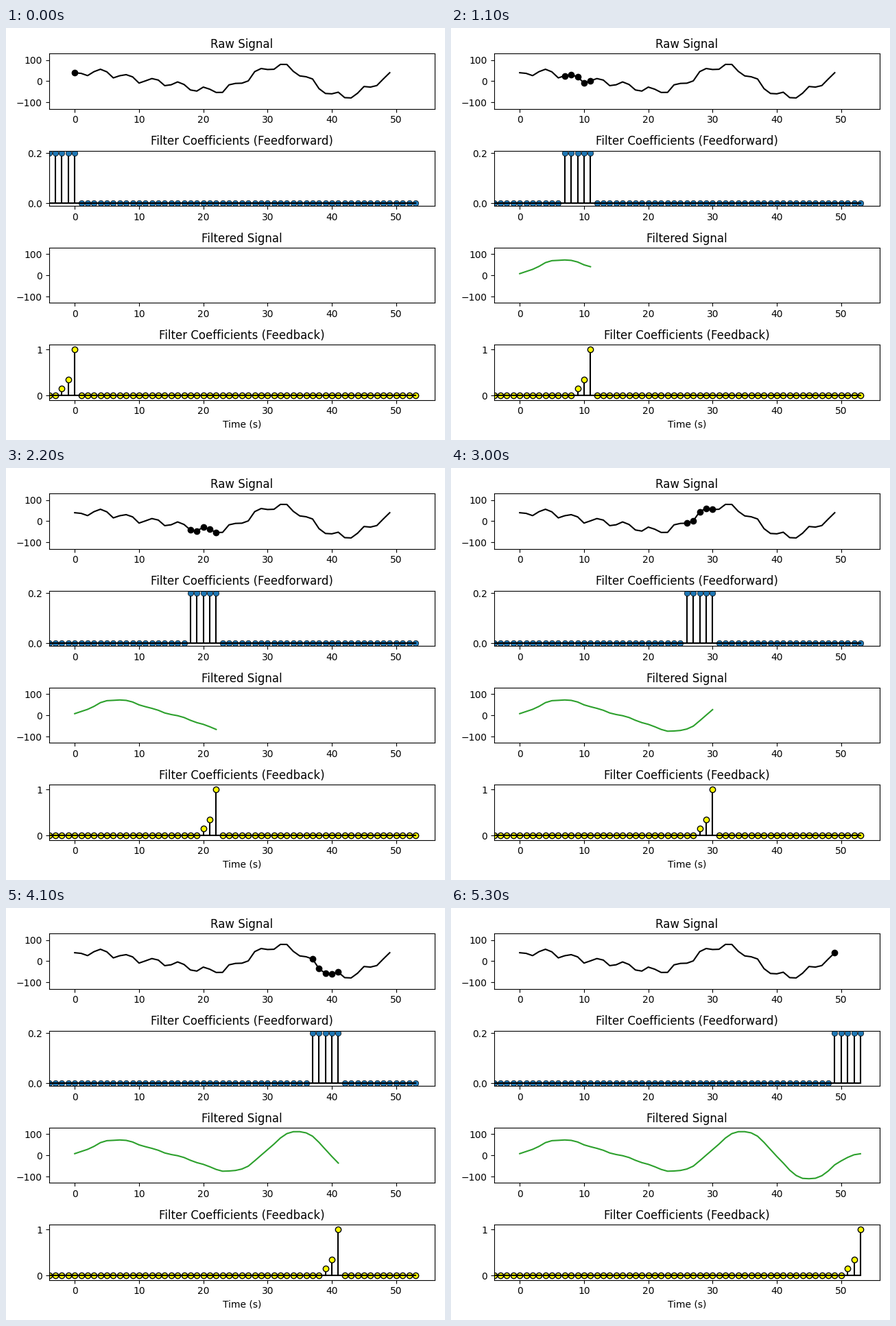
These frames come from a looping animation (640x600 px, 5400 ms). A matplotlib script:

```python
import numpy as np
import matplotlib.pyplot as plt
from matplotlib.animation import FuncAnimation

plt.rcParams["font.family"] = "DejaVu Sans"

SAMPLES = 50
FORWARD = np.full(5, 0.2)
FEEDBACK = np.array([0.15, 0.35, 1.0])  # oldest sample first
STEPS = SAMPLES + len(FORWARD) - 1
TIME = np.arange(1 - len(FORWARD), STEPS)


def raw_signal():
    """Two slow waves with a medium and a fast ripple on top."""
    phase = 2 * np.pi * np.linspace(0, 1, SAMPLES)
    return (50 * np.sin(2 * phase) + 25 * np.cos(3 * phase)
            + 15 * np.cos(12 * phase) + 3 * np.sin(23 * phase))


def run_filter(signal):
    out = np.convolve(signal, FORWARD)
    for n in range(1, STEPS):
        out[n] += FEEDBACK[1] * out[n - 1]
        if n > 1:
            out[n] += FEEDBACK[0] * out[n - 2]
    return out


def kernel_at(n, kernel):
    """Kernel placed on the time axis so that its last tap sits at n."""
    values = np.zeros(len(TIME))
    end = n - TIME[0] + 1
    values[end - len(kernel):end] = kernel
    return values


def make_stem(ax, kernel, face, edge_width):
    markers, stems, _ = ax.stem(TIME, kernel_at(0, kernel), linefmt="k-",
                                markerfmt="o", basefmt="k-")
    markers.set(markerfacecolor=face, markeredgecolor="k",
                markeredgewidth=edge_width)
    return markers, stems


def move_stem(stem, values):
    markers, stems = stem
    markers.set_ydata(values)
    stems.set_segments([[(t, 0), (t, v)] for t, v in zip(TIME, values)])


raw = raw_signal()
filtered = run_filter(raw)

fig, axes = plt.subplots(4, 1, figsize=(6.4, 6), dpi=100)
panels = [
    ("Raw Signal", (-130, 130), (-100, 0, 100)),
    ("Filter Coefficients (Feedforward)", (-0.01, 0.21), (0.0, 0.2)),
    ("Filtered Signal", (-130, 130), (-100, 0, 100)),
    ("Filter Coefficients (Feedback)", (-0.1, 1.1), (0, 1)),
]

axes[0].plot(raw, "k-")
window, = axes[0].plot([], [], "ko")
forward = make_stem(axes[1], FORWARD, "C0", 0.5)
trace, = axes[2].plot([], [], color="C2")
feedback = make_stem(axes[3], FEEDBACK, "yellow", 1.0)

for ax, (title, limits, ticks) in zip(axes, panels):
    ax.set_title(title)
    ax.set_xlim(-4, 56)
    ax.set_ylim(*limits)
    ax.set_xticks(range(0, 51, 10))
    ax.set_yticks(ticks)
axes[3].set_xlabel("Time (s)")
fig.tight_layout()


def update(n):
    seen = np.arange(max(0, n - len(FORWARD) + 1), min(n + 1, SAMPLES))
    window.set_data(seen, raw[seen])
    move_stem(forward, kernel_at(n, FORWARD))
    trace.set_data(np.arange(n + 1), filtered[:n + 1])
    move_stem(feedback, kernel_at(n, FEEDBACK))
    return window, trace, *forward, *feedback


anim = FuncAnimation(fig, update, frames=STEPS, interval=100, repeat=True,
                     repeat_delay=0)
plt.show()
```
